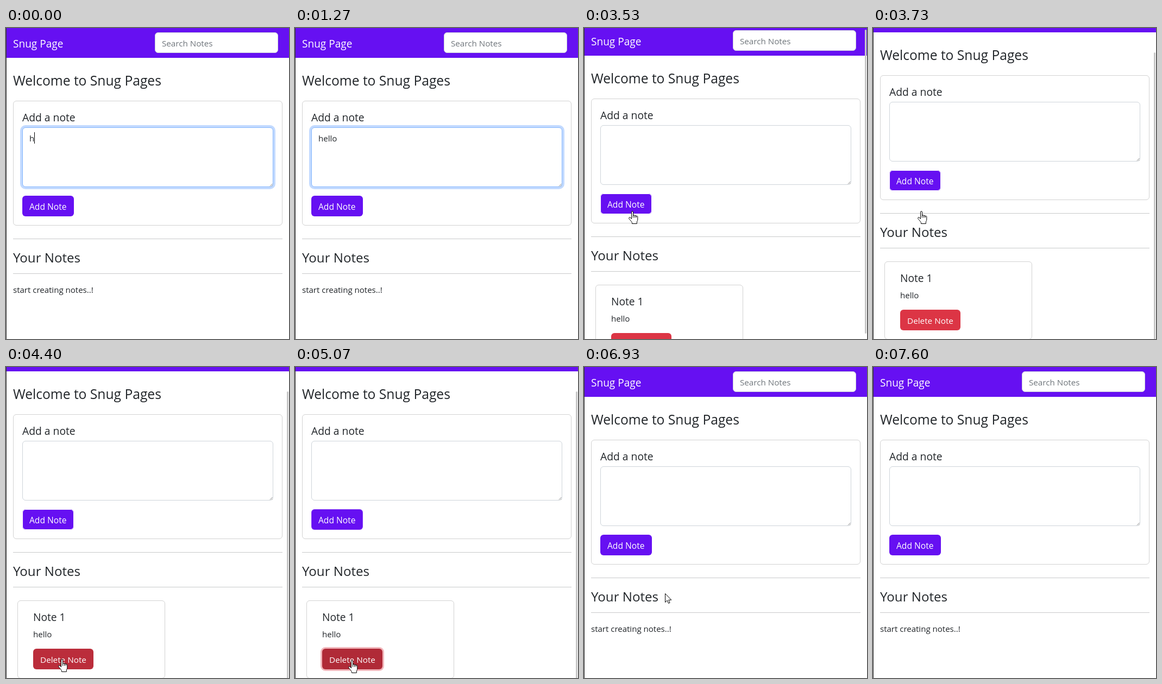
An HTML page with a canvas for the animation above (8.27 s loop, 521 by 573 pixels).

```html
<!DOCTYPE html>
<html lang="en">
<head>
<meta charset="utf-8">
<title>Notes demo</title>
<style>
  html, body { margin: 0; width: 100%; height: 100%; overflow: hidden; background: #fff; }
  canvas { display: block; }
</style>
</head>
<body>
<canvas id="stage" width="521" height="573"></canvas>
<script>
const W = 521, H = 573, LOOP = 8270, TICK = 1000 / 15;
const ctx = document.getElementById('stage').getContext('2d');

const INK = '#212529', INDIGO = '#6610f2', FIELD = '#ced4da', LINE = '#c8c9ca';

// Pointer keys: tick, hotspot x, hotspot y, shape
const POINTER = [
  [33, 166, 250, 'beam'], [35, 140, 290, 'arrow'], [37, 92, 328, 'hand'],
  [38, 87, 337, 'hand'], [57, 87, 337, 'arrow'], [59, 87, 337, 'arrow'],
  [60, 88, 352, 'arrow'], [65, 100, 527, 'hand'], [67, 102, 549, 'hand'],
  [69, 102, 549, 'hand'], [71, 104, 544, 'hand'], [72, 104, 544, 'hand'],
  [73, 103, 540, 'hand'], [77, 103, 540, 'arrow'], [79, 103, 540, 'arrow'],
  [80, 110, 518, 'arrow'], [83, 142, 401, 'arrow'], [103, 142, 401, 'arrow'],
  [114, 217, 573, null]
];
const ARROW = new Path2D('M.5 .5V16.5L4.2 13L6.5 18.4L9 17.4L6.8 12.2H11.8Z');
const HAND = new Path2D('M5.5 14.5V2.2a1.5 1.5 0 0 1 3 0V9a1.4 1.4 0 0 1 3 .4' +
  'a1.4 1.4 0 0 1 2.7 .6a1.4 1.4 0 0 1 2.6 .8V16c0 2-1.5 3.5-1.5 5v2.5H6.5V21.5' +
  'C5.5 19.5 3 17 1 14.5C0 13 1.5 11 3 12Z');

const clamp = v => Math.max(0, Math.min(1, v));

function text(str, x, y, size, color = INK) {
  ctx.font = `${size}px "Open Sans", "Noto Sans", sans-serif`;
  ctx.fillStyle = color;
  ctx.fillText(str, x, y);
}

function box(x, y, w, h, r, fill) {
  ctx.beginPath();
  ctx.roundRect(x, y, w, h, r);
  ctx.fillStyle = fill;
  ctx.fill();
}

function frame(x, y, w, h, stroke, fill = '#fff') {
  ctx.beginPath();
  ctx.roundRect(x + .5, y + .5, w - 1, h - 1, 5.5);
  ctx.fillStyle = fill;
  ctx.fill();
  ctx.lineWidth = 1;
  ctx.strokeStyle = stroke;
  ctx.stroke();
}

function rule(y) {
  ctx.fillStyle = LINE;
  ctx.fillRect(13, y, 496, 1);
}

function typed(k) {
  if (k >= 42) return '';
  return 'hello'.slice(0, k < 2 ? 1 : k < 11 ? 2 : k < 12 ? 3 : k < 16 ? 4 : 5);
}

function scrollAt(k) {
  if (k < 53 || k >= 77) return 0;
  return [4, 18, 35, 47][Math.min(k - 53, 3)];
}

function drawHeader() {
  ctx.fillStyle = INDIGO;
  ctx.fillRect(0, 0, W, 55);
  text('Snug Page', 13, 36, 19.05, '#fff');
  frame(274, 8, 227, 38, FIELD);
  text('Search Notes', 287, 34, 15.2, '#6f757b');
}

function drawTextarea(k) {
  const glow = k < 42 ? 1 : k < 43 ? .5 : 0;
  if (glow) box(26, 179, 470, 118, 10, `rgba(13,110,253,${.25 * glow})`);
  frame(30, 183, 462, 110, glow ? '#86b7fe' : FIELD);

  ctx.strokeStyle = '#888';
  ctx.beginPath();
  ctx.moveTo(486, 291.5); ctx.lineTo(490.5, 287);
  ctx.moveTo(489, 291.5); ctx.lineTo(490.5, 290);
  ctx.stroke();

  const value = typed(k);
  text(value, 43, 209, 15.1);
  const caret = k < 1 || (k >= 9 && k < 19) || (k >= 27 && k < 35);
  if (caret) {
    const x = Math.round(43 + ctx.measureText(value).width);
    ctx.fillStyle = '#000';
    ctx.fillRect(x, 192, 1, 21);
  }
}

function drawAddButton(k) {
  box(30, 309, 95, 38, 6, INDIGO);
  const edge = k < 73 ? clamp((k - 36) / 2) : k < 77 ? 1 - (k - 72) * .21 : 0;
  if (edge) {
    ctx.beginPath();
    ctx.roundRect(30.5, 309.5, 94, 37, 5.5);
    ctx.lineWidth = 1.1;
    ctx.strokeStyle = `rgba(255,255,255,${edge})`;
    ctx.stroke();
  }
  text('Add Note', 43, 335, 15.6, '#fff');
}

function drawNote(k) {
  frame(21, 477, 272, 144, '#d2d2d2');
  text('Note 1', 50, 515, 19.2);
  text('hello', 50, 545, 15.1);
  const ring = k < 73 ? 0 : Math.min(3, k - 72);
  if (ring) box(50 - ring, 566 - ring, 111 + 2 * ring, 38 + 2 * ring, 6 + ring, 'rgba(225,83,97,.42)');
  const fill = k < 65 ? '#dc3545' : k < 66 ? '#cc3140' : k < 73 ? '#bb2d3b' : '#b02a37';
  box(50, 566, 111, 38, 6, fill);
  text('Delete Note', 63, 592, 15.3, '#fff');
}

function drawPointer(k) {
  const i = POINTER.findLastIndex(p => p[0] <= k);
  if (i < 0 || !POINTER[i][3]) return;
  const [t0, x0, y0, shape] = POINTER[i];
  const [t1, x1, y1] = POINTER[i + 1];
  const u = (k - t0) / (t1 - t0);
  const x = Math.round(x0 + (x1 - x0) * u), y = Math.round(y0 + (y1 - y0) * u);

  ctx.save();
  ctx.translate(shape === 'hand' ? x - 5 : x, y);
  if (shape === 'beam') {
    ctx.fillStyle = '#000';
    ctx.fillRect(0, -8, 1, 17);
    ctx.fillRect(-3, -8, 7, 1);
    ctx.fillRect(-3, 8, 7, 1);
  } else {
    const path = shape === 'hand' ? HAND : ARROW;
    ctx.fillStyle = '#fff';
    ctx.fill(path);
    ctx.lineWidth = 1;
    ctx.strokeStyle = '#000';
    ctx.stroke(path);
    if (shape === 'hand') {
      ctx.beginPath();
      for (const kx of [8.5, 11.5, 14.2]) {
        ctx.moveTo(kx, 9);
        ctx.lineTo(kx, 12.5);
      }
      ctx.stroke();
    }
  }
  ctx.restore();
}

function draw(ms) {
  const k = Math.floor((ms % LOOP + 4) / TICK);
  const scroll = scrollAt(k), hasNote = k >= 42 && k < 77;

  ctx.fillStyle = '#fff';
  ctx.fillRect(0, 0, W, H);

  ctx.save();
  ctx.translate(0, -scroll);
  drawHeader();
  text('Welcome to Snug Pages', 13, 106, 24.6);
  frame(13, 134, 496, 230, '#d2d2d2');
  text('Add a note', 30, 172, 19.3);
  drawTextarea(k);
  drawAddButton(k);
  rule(388);
  text('Your Notes', 13, 432, 24.1);
  rule(452);
  if (hasNote) drawNote(k);
  else text('start creating notes..!', 13, 488, 15.05);
  ctx.restore();

  if (hasNote) box(517, Math.round(scroll * .98) - (scroll ? 1 : 0), 3, 560, 1.5, '#c8c8c8');
  ctx.fillStyle = '#333';
  ctx.fillRect(0, 0, 1, H);
  drawPointer(k);
}

const start = performance.now();
function loop() {
  draw(performance.now() - start);
  requestAnimationFrame(loop);
}
loop();
</script>
</body>
</html>
```
